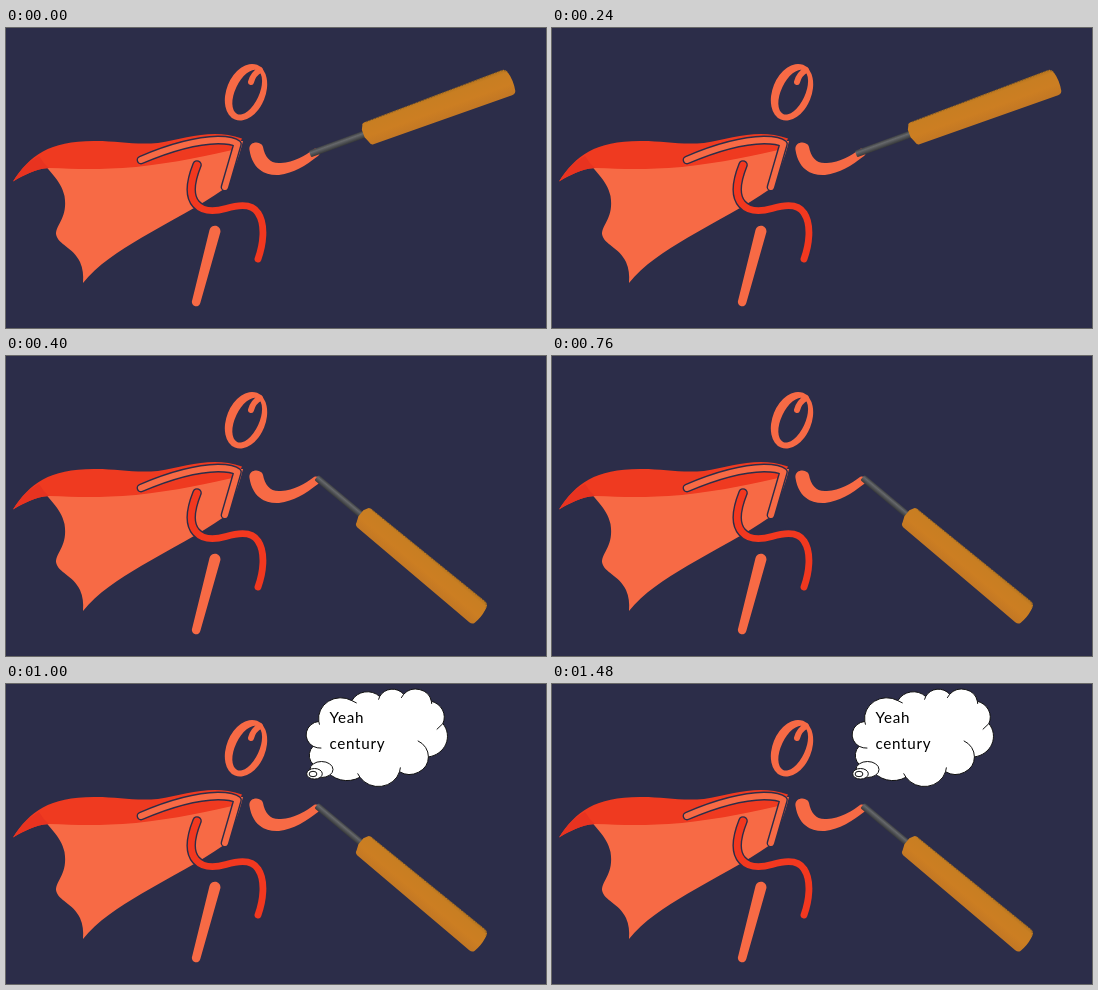
Write an HTML page that moves like this. It is 540 px wide and 300 px high and loops after 1.8 s.

```html
<!DOCTYPE html>
<html lang="en">
<head>
<meta charset="utf-8">
<title>Caped batter</title>
<style>
  html, body { margin: 0; width: 100%; height: 100%; overflow: hidden; background: #2c2d49; }
  svg { display: block; width: 100vw; height: 100vh; }
  text { font: 15.2px Lato, "Open Sans", sans-serif; letter-spacing: .7px; fill: #000; }
  .coral { fill: #f76a45; }
  .line { fill: none; stroke: #f76a45; stroke-linecap: round; stroke-linejoin: round; }
  .navy { stroke: #2c2d49; }
  .red { stroke: #f2381f; }
  #bubble path, #bubble ellipse { fill: #fff; stroke: #111; stroke-width: 1; vector-effect: non-scaling-stroke; }
  #bubble .crease { fill: none; }
</style>
</head>
<body>
<svg viewBox="0 0 540 300">
  <defs>
    <linearGradient id="wood" x1="0" y1="0" x2="0" y2="1">
      <stop offset="0" stop-color="#b5741f"/>
      <stop offset=".15" stop-color="#c87e22"/>
      <stop offset=".6" stop-color="#cc7e22"/>
      <stop offset="1" stop-color="#c27724"/>
    </linearGradient>
    <linearGradient id="grip" x1="0" y1="0" x2="0" y2="1">
      <stop offset="0" stop-color="#3d3f43"/>
      <stop offset=".35" stop-color="#66686b"/>
      <stop offset="1" stop-color="#35373a"/>
    </linearGradient>
    <path id="arm" d="M135 132C163 120 188 112.5 212 112Q227 112 231.5 116L219 159"/>
    <path id="leg" d="M191 137C185 152 182 167 190 176C197 184 208 184 220 180.5C233 176.500 246 175 252 185C260 197 257 217 252 231"/>
  </defs>
  <rect width="540" height="300" fill="#2c2d49"/>

  <!-- cape -->
  <path class="coral" d="M33 128C41 143 55 151 58.500 168C62 190 50 196 50 206C52 217 67 219 74 234Q78 243 77 255C91 237 113 223 135 210C166 192 192 179 218 161C226 147 233 130 237 113L150 116Z"/>
  <path fill="#ef3a20" d="M7 153.500C24 127 44 112.500 90 113C112 113 128 117 152 115C181 110 207 100 236 110.500L231 121C205 127 168 135 130 139C92 142 72 141 43 140C29 141 18 147 7 153.500Z"/>
  <path fill="#e83320" d="M7 153.500C15 141 23 133 33 128Q37 135 43 140C29 141 18 147 7 153.500Z"/>

  <!-- body -->
  <use href="#arm" class="line navy" stroke-width="8.8"/>
  <use href="#arm" class="line" stroke-width="6"/>
  <use href="#leg" class="line navy" stroke-width="9.6"/>
  <use href="#leg" class="line red" stroke-width="6.8"/>
  <path class="coral" d="M203.500 202A5.500 5.500 0 0 1 214.300 204.500L194.300 275A4.200 4.200 0 0 1 186 273Z"/>
  <path class="coral" d="M243.500 122C242 113 255 112 257 119C259 129 264 136 275 135C288 134 299 128 308 121C313 119 316 125 312 128C299 138 288 145 273 147C257 148 246 139 243.500 122Z"/>

  <!-- head -->
  <ellipse class="coral" cx="240" cy="64.200" rx="19.500" ry="29.500" transform="rotate(22 240 64.200)"/>
  <ellipse cx="241.200" cy="64.200" rx="12" ry="24" fill="#2c2d49" transform="rotate(25 241.200 64.200)"/>
  <path class="line" d="M254 42Q247 46 245 54" stroke-width="6"/>

  <g id="bat">
    <rect x="0" y="-3.500" width="61" height="7" rx="1.500" fill="url(#grip)"/>
    <path fill="url(#wood)" d="M59 -9Q59 -11 62 -11.200L208 -13.200Q212 -13.500 213.500 -10Q216.500 0 214.500 11Q213.500 13.800 210 13.800L63 12.500Q60 12.300 59.500 9L57 3V-5Z"/>
    <path d="M64 -11L207 -12.900Q212 -12.700 213.500 -9" fill="none" stroke="#6b512d" stroke-width=".9" stroke-dasharray="1.5 1.5"/>
  </g>

  <g id="bubble">
    <g transform="translate(300 5) scale(.00655 .004514)">
      <path d="M1950 7185A3376 4595 0 0 1 7005 2580A2666 3633 0 0 1 11250 1665A2182 2972 0 0 1 14910 1170A2428 3297 0 0 1 19140 2715A2666 3636 0 0 1 20895 7665A3387 4610 0 0 1 18690 15045A2892 3933 0 0 1 14280 18330A3376 4607 0 0 1 8235 19545A3860 5271 0 0 1 2910 17640A2180 2959 0 0 1 1080 12690A2172 2972 0 0 1 1950 7185Z"/>
      <path class="crease" d="M17064 11477A2892 3933 0 0 1 18690 15045M2346 13089Q1700 13150 1080 12690M3464 17449L2910 17640M8235 19545L7880 18700M14280 18330L14414 17376M20895 7665L19960 8960M19140 2715L19190 3300M14910 1170L14539 1976M11250 1665L11070 2360M7005 2580L7735 3105M1950 7185L2063 7894"/>
    </g>
    <ellipse cx="315.500" cy="85.500" rx="11.500" ry="8"/>
    <ellipse cx="308.500" cy="89.800" rx="7.800" ry="5.300"/>
    <ellipse cx="307" cy="90" rx="3.900" ry="2.700"/>
    <text x="323.500" y="39">Yeah</text>
    <text x="323.500" y="64.500">century</text>
  </g>
</svg>
<script>
  const LOOP = 1800, SWING = 400, SPEAK = 1000;
  const bat = document.getElementById('bat');
  const bubble = document.getElementById('bubble');
  const raised = 'translate(304 126) rotate(-20)';
  const lowered = 'translate(310.5 121.5) rotate(39.8) scale(1 .97)';

  function draw(ms) {
    const t = ms % LOOP;
    bat.setAttribute('transform', t < SWING ? raised : lowered);
    bubble.setAttribute('visibility', t < SPEAK ? 'hidden' : 'visible');
  }

  let start;
  function tick(now) {
    start ??= now;
    draw(now - start);
    requestAnimationFrame(tick);
  }
  draw(0);
  requestAnimationFrame(tick);
</script>
</body>
</html>
```
